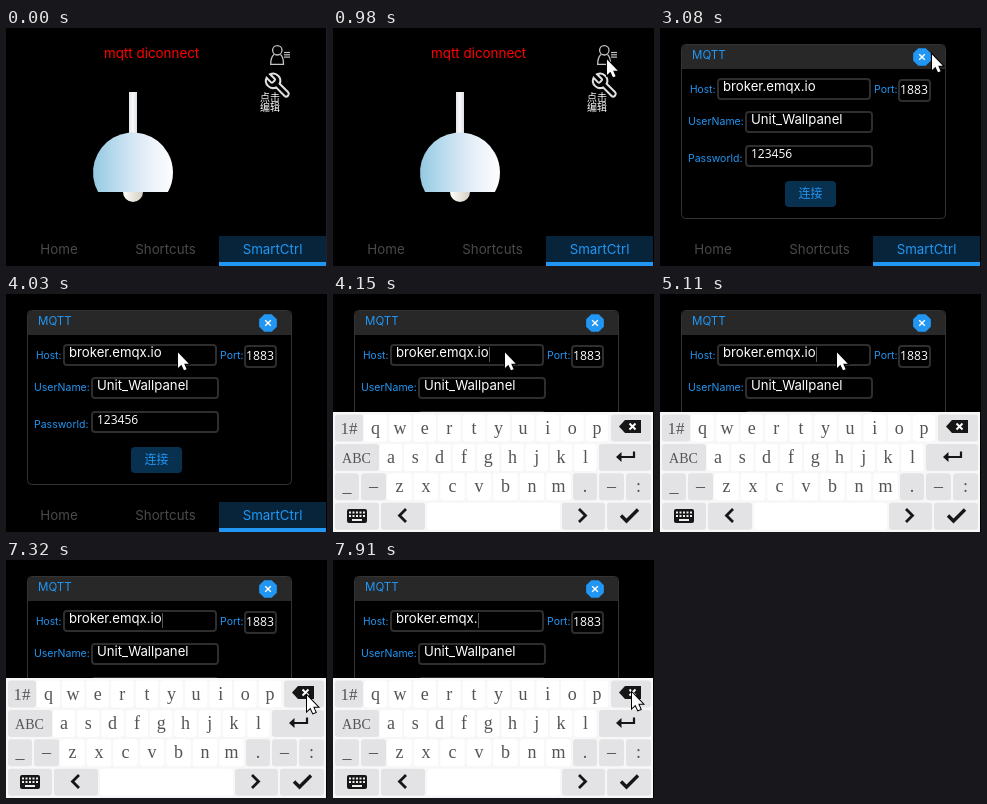
Animation of 321x238 px, one loop 8000 ms. Source, as an HTML page with a canvas:

```html
<!DOCTYPE html>
<html lang="en">
<head>
<meta charset="utf-8">
<title>Smart lamp panel</title>
<style>
  html, body { margin: 0; width: 100%; height: 100%; overflow: hidden; background: #000; }
  canvas { display: block; width: 321px; height: 238px; }
</style>
</head>
<body>
<canvas id="stage" width="321" height="238"></canvas>
<script>
const ctx = document.getElementById('stage').getContext('2d');
const LOOP = 8000;
const BLUE = '#2196f3';
const UI = 'Inter, sans-serif';
const DIGITS = '"Open Sans", sans-serif';
const CJK = '"Noto Sans CJK SC", "Noto Sans CJK", sans-serif';
const SERIF = '"Liberation Serif", serif';

// [time, x, y] of the pointer, held until the next entry
const POINTER = [
  [430, 295, 44], [550, 284, 38], [670, 274, 32], [1820, 272, 27],
  [3730, 192, 36], [3880, 172, 59], [4430, 177, 59],
  [6810, 190, 70], [6930, 222, 93], [7050, 262, 116], [7170, 288, 128],
  [7320, 301, 136], [7470, 299, 133]
];
const HOST = [[0, 'broker.emqx.io'], [7620, 'broker.emqx.i'], [7910, 'broker.emqx.']];
const CARET_FLIPS = [4150, 4710, 5110, 5510, 6040, 6500, 6930, 7470, 7620];
const EDGE_GONE = 980, PRESS_ICON = 2800, OPEN_DIALOG = 3080, OPEN_KEYS = 4150;

const current = (steps, t) => steps.filter(s => s[0] <= t).pop();

function text(str, x, y, size, color, family = UI, align = 'left') {
  ctx.font = `${size}px ${family}`;
  ctx.fillStyle = color;
  ctx.textAlign = align;
  ctx.fillText(str, x, y);
}

function rect(x, y, w, h, color) {
  ctx.fillStyle = color;
  ctx.fillRect(x, y, w, h);
}

function round(x, y, w, h, r, fill, stroke, line = 1) {
  ctx.beginPath();
  ctx.roundRect(x, y, w, h, r);
  if (fill) { ctx.fillStyle = fill; ctx.fill(); }
  if (stroke) { ctx.strokeStyle = stroke; ctx.lineWidth = line; ctx.stroke(); }
}

function trace(points) {
  ctx.beginPath();
  points.forEach(([x, y]) => ctx.lineTo(x, y));
}

function polyline(points, color, line) {
  trace(points);
  ctx.strokeStyle = color;
  ctx.lineWidth = line;
  ctx.stroke();
}

function cross(x, y, r, color, line) {
  polyline([[x - r, y - r], [x + r, y + r]], color, line);
  polyline([[x - r, y + r], [x + r, y - r]], color, line);
}

function gradient(x0, x1, ...colors) {
  const g = ctx.createLinearGradient(x0, 0, x1, 0);
  colors.forEach((c, i) => g.addColorStop(i / (colors.length - 1), c));
  return g;
}

function drawLamp() {
  rect(123, 64, 8, 42, gradient(123, 131, '#e4e6ea', '#fafafa', '#dcdfe5'));
  ctx.beginPath();
  ctx.arc(127, 164, 10, 0, Math.PI);
  ctx.fillStyle = gradient(117, 137, '#fffdf8', '#e9e6df', '#d3cfc6');
  ctx.fill();
  const dip = Math.asin(19.5 / 40);
  ctx.beginPath();
  ctx.arc(127, 144.5, 40, Math.PI - dip, dip);
  ctx.closePath();
  ctx.fillStyle = gradient(87, 167, '#94c9e1', '#b5d9ec', '#d5e6f4', '#edf3fa', '#fdfdff');
  ctx.fill();
}

function drawPerson(color) {
  ctx.strokeStyle = color;
  ctx.lineWidth = 1.3;
  ctx.beginPath();
  ctx.arc(271.3, 22.3, 4.7, 0, 2 * Math.PI);
  ctx.stroke();
  ctx.beginPath();
  ctx.moveTo(268, 26.5);
  ctx.quadraticCurveTo(264.7, 29, 264.7, 36.4);
  ctx.lineTo(277.5, 36.4);
  ctx.quadraticCurveTo(277.5, 29, 274.5, 26.5);
  ctx.stroke();
  for (const y of [24.5, 26.8, 29.1]) polyline([[278, y], [284, y]], color, 1.2);
}

const wrench = new Path2D('M14.7 6.3a1 1 0 0 0 0 1.4l1.6 1.6a1 1 0 0 0 1.4 0l3.77-3.77' +
  'a6 6 0 0 1-7.94 7.94l-6.91 6.91a2.12 2.12 0 0 1-3-3l6.91-6.91a6 6 0 0 1 7.94-7.94l-3.76 3.76z');

function drawWrench() {
  ctx.save();
  ctx.translate(286.3, 43.2);
  ctx.scale(-1.2, 1.2);
  ctx.strokeStyle = '#e0e0e0';
  ctx.lineWidth = 1.7;
  ctx.stroke(wrench);
  ctx.restore();
}

function drawHome(t) {
  text('mqtt diconnect', 98, 30, 13.4, '#f00');
  drawLamp();
  drawPerson(t < PRESS_ICON ? '#c4c4c4' : '#b0b0b0');
  drawWrench();
  text('点击', 264, 73, 10, '#fff', CJK, 'center');
  text('编辑', 264, 83, 10, '#fff', CJK, 'center');
  rect(213, 208, 107, 30, '#08243a');
  rect(213, 234, 107, 4, BLUE);
  text('Home', 53, 226, 13.3, '#4a4a4a', UI, 'center');
  text('Shortcuts', 159.5, 226, 13.3, '#4a4a4a', UI, 'center');
  text('SmartCtrl', 266.5, 226, 13.3, BLUE, UI, 'center');
}

function field(x, y, w, h) {
  round(x + 1, y + 1, w - 2, h - 2, 3, '#000', '#2e2e2e', 2);
}

function caretVisible(t) {
  return CARET_FLIPS.filter(f => f <= t).length % 2 === 1;
}

function drawCloseButton(x, y) {
  const corners = Array.from({ length: 8 }, (_, i) => {
    const a = (i + 0.5) * Math.PI / 4;
    return [x + 9.6 * Math.cos(a), y + 9.6 * Math.sin(a)];
  });
  trace(corners);
  ctx.fillStyle = BLUE;
  ctx.fill();
  cross(x, y, 2.8, '#fff', 1.4);
}

function drawDialog(t) {
  round(21.5, 16.5, 264, 174, 4, '#000', '#333');
  round(22, 17, 263, 24, [4, 4, 0, 0], '#282828');
  text('MQTT', 32, 31.3, 11.5, BLUE);
  drawCloseButton(262, 29);

  field(57, 50, 154, 22);
  field(238, 51, 33, 23);
  field(85, 83, 128, 22);
  field(85, 117, 128, 22);
  text('Host:', 30, 65, 10.2, BLUE);
  text('Port:', 214, 65, 10.5, BLUE);
  text('UserName:', 28, 97, 10.5, BLUE);
  text('Passworld:', 28, 134, 10.5, BLUE);

  const host = current(HOST, t)[1];
  text(host, 63, 63, 13.2, '#fff');
  if (caretVisible(t)) rect(Math.round(63 + ctx.measureText(host).width), 53, 1, 15, '#555');
  text('1883', 240, 66, 12.2, '#fff', DIGITS);
  text('Unit_Wallpanel', 91, 96, 13.2, '#fff');
  text('123456', 91, 130, 12, '#fff', DIGITS);

  round(125, 153, 51, 26, 4, '#08304f');
  text('连接', 150.5, 170, 12, BLUE, CJK, 'center');
}

function key(x0, x1, row, fill = '#e3e3e5') {
  round(x0, 120.5 + row * 29.4, x1 - x0, 27, 3, fill);
}

function label(str, x, row, size = 18) {
  text(str, x, 139.5 + row * 29.4, size, '#555', SERIF, 'center');
}

function letters(str, first, step, row) {
  [...str].forEach((c, i) => {
    const x = first + i * step;
    key(x - step / 2 + 1, x + step / 2 - 1, row, '#fff');
    label(c, x, row);
  });
}

function drawKeyIcons() {
  const ink = '#161616';
  trace([[286, 132.5], [292, 126], [308, 126], [308, 139], [292, 139]]);
  ctx.fillStyle = ink;
  ctx.fill();
  cross(299.5, 132.5, 3, '#fff', 2);

  polyline([[301, 157.5], [301, 163], [287, 163]], ink, 2.2);
  trace([[283, 163], [288.5, 158], [288.5, 168]]);
  ctx.fill();

  round(14, 215, 20, 14, 2, ink);
  for (let i = 0; i < 5; i++) {
    rect(16 + i * 3.5, 217.5, 2, 2, '#eee');
    rect(16 + i * 3.5, 221, 2, 2, '#eee');
  }
  rect(19, 225, 10, 2, '#eee');

  polyline([[73, 215], [66.5, 221.5], [73, 228]], ink, 2.8);
  polyline([[246, 215], [252.5, 221.5], [246, 228]], ink, 2.8);
  polyline([[288, 221.5], [293.5, 227], [305, 215.5]], ink, 3.4);
}

function drawKeyboard(t) {
  const pressed = t >= 7620 && t < 7760;
  rect(0, 118, 320, 120, '#f7f7f7');
  key(2, 30, 0);
  label('1#', 16, 0, 17);
  letters('qwertyuiop', 42.5, 24.6, 0);
  key(278, 318, 0, pressed ? '#cbcbcd' : undefined);

  key(2, 46, 1);
  label('ABC', 23.5, 1, 14);
  letters('asdfghjkl', 58, 24.3, 1);
  key(266, 318, 1);

  [['_', 2, 26], ['–', 28, 53], ['.', 240, 264], ['–', 266, 291], [':', 293, 318]]
    .forEach(([c, x0, x1]) => {
      key(x0, x1, 2);
      label(c, (x0 + x1) / 2, 2);
    });
  letters('zxcvbnm', 66.5, 26.5, 2);

  [[2, 46], [48, 92], [229, 272], [274, 318]].forEach(([x0, x1]) => key(x0, x1, 3));
  key(94, 227, 3, '#fff');
  drawKeyIcons();
}

function drawPointer(x, y) {
  ctx.save();
  ctx.translate(x, y);
  trace([[0, -0.5], [0, 15], [3.4, 11.8], [6, 17.3], [8.6, 16.2], [6.2, 10.8], [10.8, 10.8]]);
  ctx.closePath();
  ctx.strokeStyle = '#000';
  ctx.lineWidth = 2;
  ctx.stroke();
  ctx.fillStyle = '#fff';
  ctx.fill();
  ctx.restore();
}

function draw(t) {
  rect(0, 0, 321, 238, '#000');
  if (t < EDGE_GONE) rect(320, 0, 1, 238, '#20202c');
  drawHome(t);
  if (t >= OPEN_DIALOG) drawDialog(t);
  if (t >= OPEN_KEYS) drawKeyboard(t);
  const pointer = current(POINTER, t);
  if (pointer) drawPointer(pointer[1], pointer[2]);
}

const start = performance.now();
function tick() {
  draw((performance.now() - start) % LOOP);
  requestAnimationFrame(tick);
}
tick();
</script>
</body>
</html>
```
